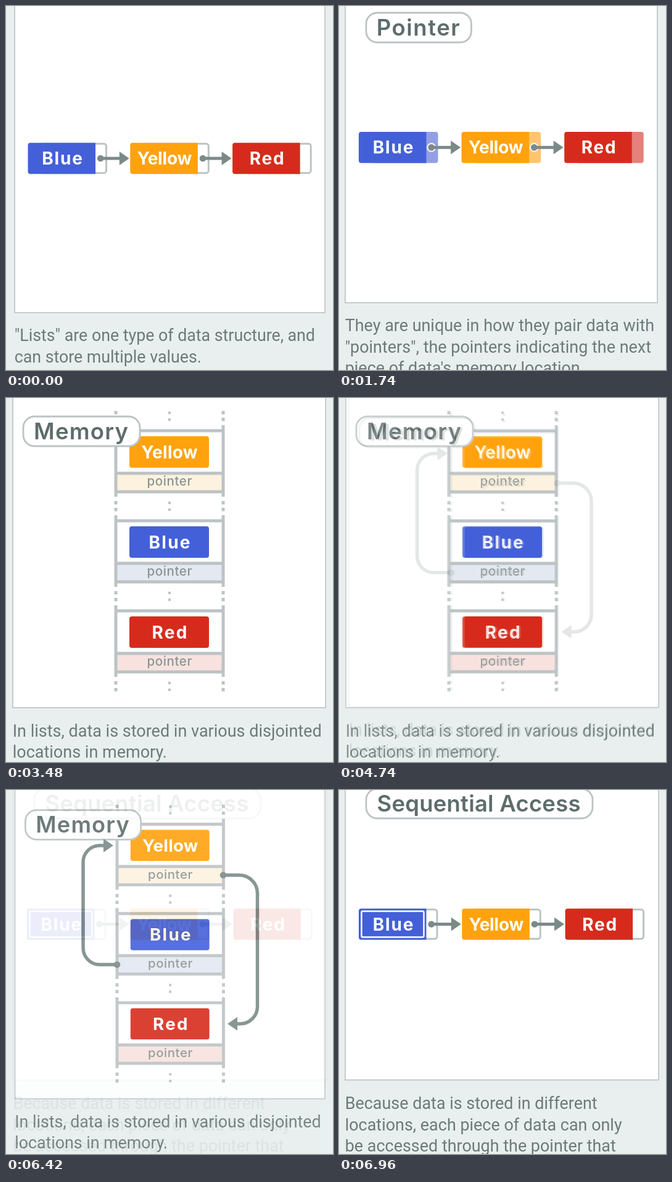
Recreate the animation shown at these times as an HTML page. Size 530x590 px, loop 8000 ms.

```html
<!DOCTYPE html>
<html lang="en">
<head>
<meta charset="utf-8">
<title>Lists in memory</title>
<style>
  html, body { margin: 0; width: 100%; height: 100%; overflow: hidden; background: #e9efef; }
  svg { display: block; width: 530px; height: 590px; }
  .caption { font-family: Roboto, sans-serif; fill: #6c7b79; }
  .label { font: 700 28px Inter, sans-serif; fill: #fff; }
  .title { font: 600 36.5px Inter, sans-serif; fill: #5e6d6b; }
  .cell { font: 500 20.5px Inter, sans-serif; fill: #8b9593; }
</style>
</head>
<body>
<svg id="stage" viewBox="0 0 530 590"></svg>
<script>
const LOOP = 8000, STEP = 60, STEPS = 10, DRIFT = 2;
const STARTS = [1200, 2940, 4680, 6420];
const DARK = '#7b8a88', LINE = '#bcc3c4';
const ITEMS = [
  { name: 'Blue', fill: '#4460d8', light: '#929fe4', band: '#e4e8f1', gap: 1.8 },
  { name: 'Yellow', fill: '#ffa20e', light: '#ffc46c', band: '#fdf2df', gap: -.2 },
  { name: 'Red', fill: '#d62b1c', light: '#e5807a', band: '#f8e2df', gap: 1.8 }
];

const rect = (x, y, w, h, fill, more = '') =>
  `<rect x="${x}" y="${y}" width="${w}" height="${h}" fill="${fill}" ${more}/>`;
const circle = (x, y, r, fill) => `<circle cx="${x}" cy="${y}" r="${r}" fill="${fill}"/>`;
const path = (d, color, width) => `<path d="${d}" fill="none" stroke="${color}" stroke-width="${width}"/>`;

// Centred text; half the tracking balances the trailing gap.
const text = (kind, str, x, y, gap = 0) =>
  `<text class="${kind}" x="${x + gap / 2}" y="${y}" text-anchor="middle" letter-spacing="${gap}">${str}</text>`;

const head = (tip, y, dir) =>
  `<path d="M${tip} ${y}l${-16 * dir} -11v22z" fill="${DARK}"/>`;

function page(x, right, bottom, size, base, lines) {
  const rows = lines.map((s, i) =>
    `<text class="caption" x="${x - .3}" y="${base + i * 34.5}" font-size="${size}">${s}</text>`);
  return rect(-20, -20, 580, 640, '#e9efef') +
    rect(x, -20, right - x, bottom + 20, '#fff', 'stroke="#c2c8c7" stroke-width="1.8"') + rows.join('');
}

function pill(str, x, y, w, gap) {
  return rect(x, y, w, 48, '#fff', `rx="18" stroke="${LINE}" stroke-width="2.8"`) +
    text('title', str, x + w / 2 - 1, y + 36.5, gap);
}

function row(x, y, pitch, tinted) {
  const h = 50.5, main = 109.5, full = 128.5, mid = y + h / 2;
  let out = '';
  ITEMS.forEach((it, i) => {
    const left = x + i * pitch;
    out += tinted
      ? rect(left + 20, y, full - 20, h, it.light, 'rx="4"')
      : rect(left + 20, y + 1.5, full - 21.5, h - 3, '#fff', `rx="4" stroke="${LINE}" stroke-width="3"`);
    out += `<path d="M${left + main} ${y}v${h}h${4 - main}q-4 0 -4 -4v${8 - h}q0 -4 4 -4z" fill="${it.fill}"/>`;
    out += text('label', it.name, left + main / 2 + .8, mid + 10, it.gap);
  });
  for (let i = 0; i < 2; i++) {
    const dot = x + i * pitch + 117.7, tip = x + (i + 1) * pitch - 1.5;
    if (tinted) out += circle(dot, mid, 7.6, '#eef0f2');
    out += path(`M${dot} ${mid}H${tip - 14}`, DARK, 5) + circle(dot, mid, 5.3, DARK) + head(tip, mid, 1);
  }
  return out;
}

function memory() {
  let out = page(11, 518, 502, 27, 548.5,
    ['In lists, data is stored in various disjointed', 'locations in memory.']);
  [1, 0, 2].forEach((n, i) => {
    const it = ITEMS[n], y = 53 + i * 146;
    out += rect(178, y + 69, 174, 30, it.band);
    for (const dy of [0, 69, 99]) out += path(`M178 ${y + dy}H352`, LINE, 5);
    for (const x of [178, 352]) out += path(`M${x} ${y - 9}V${y + 107}`, LINE, 5);
    out += rect(200, y + 9, 129, 51, it.fill, 'rx="4"');
    out += text('label', it.name, 265, y + 44.5, it.gap + .5);
    out += text('cell', 'pointer', 265, y + 89, .6);
  });
  for (let i = 0; i < 4; i++)
    for (const y of [24, 35]) {
      for (const x of [178, 352]) out += rect(x - 2.5, y + i * 146 - 3, 5, 5.5, LINE);
      out += rect(263, y + i * 146 - 2, 4, 4, LINE);
    }
  return out + pill('Memory', 28, 30, 189, 1.2);
}

function links() {
  return path('M180 283H152a27 27 0 0 1 -27 -27V117a27 27 0 0 1 27 -27H160', DARK, 5.5) +
    circle(180, 283, 5.3, DARK) + head(174, 90, 1) +
    path('M352 138H378a29.5 29.5 0 0 1 29.5 29.5V351a28 28 0 0 1 -28 28H373', DARK, 5.5) +
    circle(352, 138, 5.3, DARK) + head(359, 379, -1);
}

const slides = [
  page(14, 517, 497, 26.75, 543, ['"Lists" are one type of data structure, and', 'can store multiple values.']) +
    row(35.5, 221.7, 165.8, false),
  page(10, 516, 481, 26.95, 527, ['They are unique in how they pair data with',
    '"pointers", the pointers indicating the next', "piece of data's memory location."]) +
    pill('Pointer', 44, 11, 170.5, 1.5) + row(32, 204, 166.6, true),
  memory(),
  `<g transform="matrix(.991 0 0 .991 3.6 3)">${memory()}</g>` + links(),
  page(10, 518, 470, 26.95, 517, ['Because data is stored in different',
    'locations, each piece of data can only', 'be accessed through the pointer that']) +
    pill('Sequential Access', 44, -2, 367, .2) + row(32, 192.3, 167.3, false) +
    rect(36.5, 196.5, 101, 42, 'none', 'rx="2" stroke="#fff" stroke-width="2.4"')
];

const stage = document.getElementById('stage');
stage.innerHTML = slides.map(s => `<g class="slide">${s}</g>`).join('');
const layers = [...stage.querySelectorAll('.slide')];

// Each slide dissolves over the one below in equal steps, settling slightly to the left.
function draw(t) {
  layers.forEach((layer, i) => {
    const step = i ? Math.floor((t - STARTS[i - 1]) / STEP) + 1 : STEPS;
    const alpha = Math.max(0, Math.min(1, step / STEPS));
    layer.setAttribute('opacity', alpha);
    layer.setAttribute('visibility', alpha ? 'visible' : 'hidden');
    layer.setAttribute('transform', `translate(${DRIFT * (1 - alpha)} 0)`);
  });
}

const begin = performance.now();
function tick() {
  draw((performance.now() - begin) % LOOP);
  requestAnimationFrame(tick);
}
draw(0);
requestAnimationFrame(tick);
</script>
</body>
</html>
```
